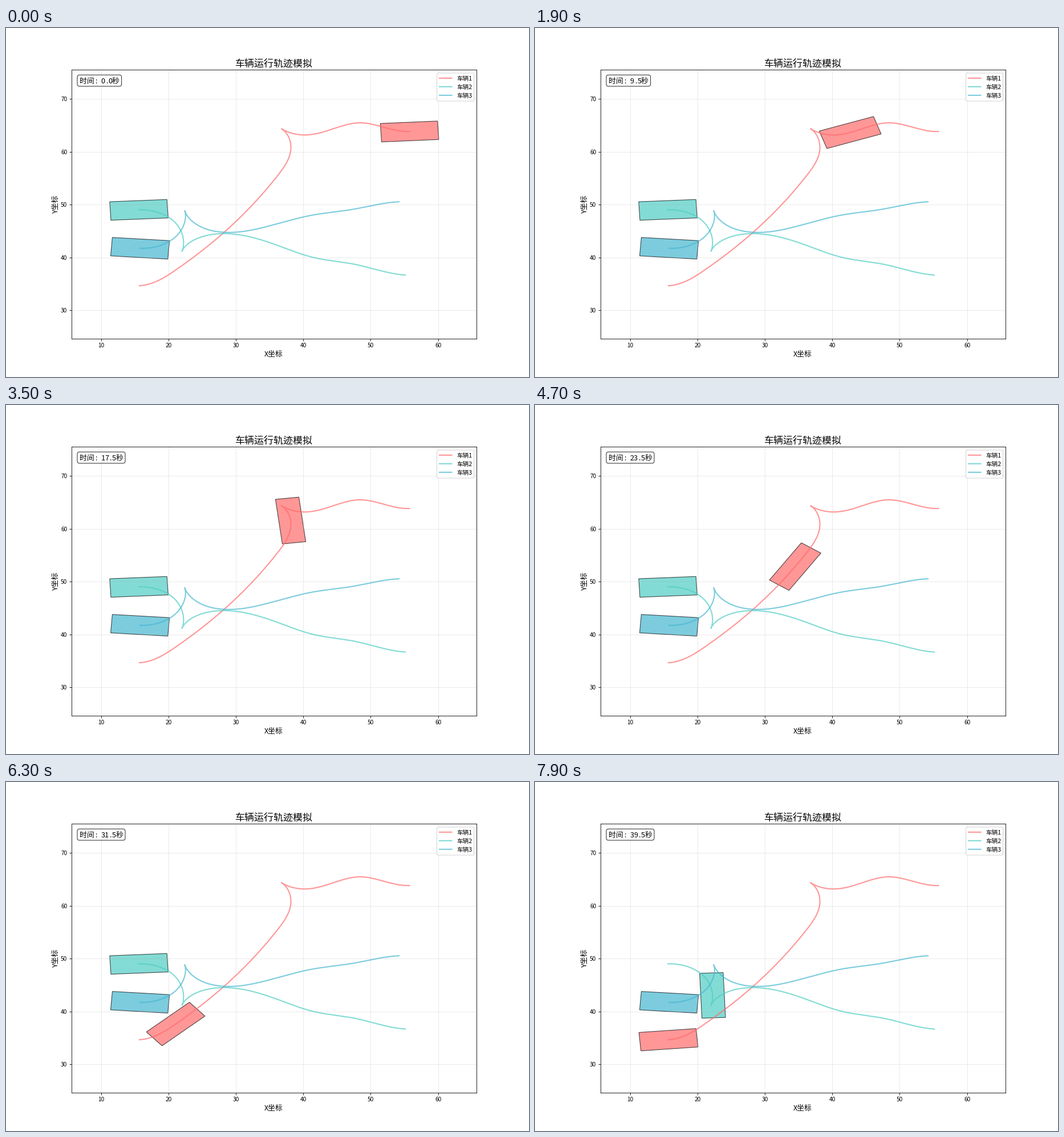
Animation of 917 by 611 pixels, one loop 8 s. Source, as a matplotlib script:

```python
import numpy as np
import matplotlib.pyplot as plt
from matplotlib.animation import FuncAnimation
from matplotlib.patches import FancyBboxPatch, Polygon

W, H, DPI, FRAMES = 917, 611, 64, 80
UNIT = 76.4 / DPI            # design points to figure points
EM = 76.4 / 72               # design points to pixels
LENGTH, WIDTH = 8.5, 3.5     # car size in plot units

plt.rcParams["font.family"] = ["Noto Sans CJK JP", "DejaVu Sans"]


def spline(t, y, v0, v1, u):
    """Smooth cubic through (t, y) with given end slopes, read at u."""
    t, y = np.array(t, float), np.array(y, float)
    h, d = np.diff(t), np.diff(y) / np.diff(t)
    a, b = np.eye(len(t)), np.zeros(len(t))
    b[0], b[-1] = v0, v1
    for i in range(1, len(t) - 1):
        a[i, i - 1:i + 2] = h[i], 2 * (h[i - 1] + h[i]), h[i - 1]
        b[i] = 3 * (h[i] * d[i - 1] + h[i - 1] * d[i])
    m = np.linalg.solve(a, b)
    u = np.clip(u, t[0], t[-1])
    j = np.clip(np.searchsorted(t, u) - 1, 0, len(h) - 1)
    q = (u - t[j]) / h[j]
    return (y[j] + (y[j + 1] - y[j]) * q * q * (3 - 2 * q)
            + h[j] * q * (1 - q) * (m[j] * (1 - q) - m[j + 1] * q))


def leg(points, head0, head1):
    """Curve through a few points, leaving and arriving at given headings."""
    p = np.array(points)
    t = np.r_[0, np.cumsum(np.hypot(*np.diff(p, axis=0).T))]
    u = np.linspace(0, t[-1], 500)
    return np.column_stack([spline(t, c, f(head0), f(head1), u)
                            for c, f in zip(p.T, (np.cos, np.sin))])


class Track:
    """Drive forward to a cusp, then reverse; headings are the car's own."""

    def __init__(self, forward, back, headings):
        start, cusp, end = np.radians(headings)
        runs = leg(forward, start, cusp), leg(forward[-1:] + back, cusp + np.pi, end + np.pi)
        self.xy = np.concatenate(runs)
        turn = [np.arctan2(*np.gradient(r, axis=0).T[::-1]) + np.pi * i
                for i, r in enumerate(runs)]
        self.heading = np.unwrap(np.concatenate(turn))
        self.s = np.r_[0, np.cumsum(np.hypot(*np.diff(self.xy, axis=0).T))]

    def outline(self, s):
        x, y, q = (np.interp(s, self.s, v) for v in (*self.xy.T, self.heading))
        c, n = np.cos(q), np.sin(q)
        box = np.array([(-1, -1), (1, -1), (1, 1), (-1, 1)]) * (LENGTH / 2, WIDTH / 2)
        return box @ np.array([(c, n), (-n, c)]) + (x, y)


red = Track([(55.77, 63.82), (48.45, 65.46), (40.24, 63.16), (36.78, 64.35)],
            [(38.17, 60.7), (36.1, 55.3), (21.17, 37.68), (15.71, 34.63)],
            (183.3, 140, 4.5))
teal = Track([(15.63, 48.99), (20.57, 47.1), (22.25, 42.97), (22.01, 41.14)],
             [(24.26, 43.56), (27.98, 44.49), (36.52, 42.11), (41.6, 39.95),
              (47.5, 38.72), (55.14, 36.65)],
             (3, -108, 175))
blue = Track([(15.8, 41.72), (20.66, 43.46), (22.39, 46.54), (22.42, 48.81)],
             [(24.68, 45.86), (28.66, 44.72), (35.25, 46.05), (41.6, 48.05),
              (47.1, 49.03), (54.2, 50.51)],
             (-4.2, 105, 183))

# Distance covered at each frame: speed up, ease through the cusp, speed up, stop.
frames = np.arange(FRAMES)
red_s = spline([0, 9, 19, 29, 35, 47, 63, 74],
               [0, 5.1, 13.65, 19.95, 23.05, 32.7, 53.05, red.s[-1]], .25, 0, frames)
teal_s = spline([64, 79], [0, 9.95], .25, .5, frames)
cars = [(red, "#FF6B6B", red_s), (teal, "#4ECDC4", teal_s), (blue, "#45B7D1", 0 * frames)]

fig = plt.figure(figsize=(W / DPI, H / DPI), dpi=DPI, facecolor="white")
ax = fig.add_axes([.125, .11, .775, .77])
ax.set(xlim=(5.61, 65.73), ylim=(24.62, 75.48),
       xticks=range(10, 61, 10), yticks=range(30, 71, 10))
ax.grid(True, alpha=.3, lw=.8 * UNIT)
ax.tick_params(length=3.5 * UNIT, width=.8 * UNIT, pad=3.5 * UNIT, labelsize=9.5 * UNIT)
for spine in ax.spines.values():
    spine.set_linewidth(.8 * UNIT)

# Overlay measured in pixels, for text and boxes.
ui = fig.add_axes([0, 0, 1, 1])
ui.set(xlim=(0, W), ylim=(H, 0))
ui.axis("off")


def label(x, y, s, size, ha="center"):
    return ui.text(x, y + .38 * size * EM, s, size=size * UNIT, ha=ha, va="baseline")


def panel(x, y, w, h, r, edge):
    return ui.add_patch(FancyBboxPatch(
        (x, y), w, h, boxstyle=f"round,pad=0,rounding_size={r}",
        fc="white", ec=edge, lw=UNIT, alpha=.8))


label(469.8, 61.5, "车辆运行轨迹模拟", 16)
label(469.5, 570, "X坐标", 12)
ui.text(86 + .38 * 12 * EM, 309, "Y坐标", size=12 * UNIT, rotation=90,
        rotation_mode="anchor", ha="center", va="baseline")

panel(755.5, 79, 65, 49, 2.1, "0.8")
bodies = []
for i, (track, color, travel) in enumerate(cars):
    stroke = dict(color=color, alpha=.7, lw=2 * UNIT)
    ax.plot(*track.xy.T, **stroke)
    bodies.append(ax.add_patch(Polygon(track.outline(0), fc=color, ec="black",
                                       alpha=.7, lw=UNIT)))
    y = 87.8 + 15 * i
    ui.plot([760, 781.5], [y, y], snap=False, **stroke)
    label(790, y, f"车辆{i + 1}", 10, ha="left")

clock_box = panel(125, 82.2, 77.6, 19.8, 3.8, "black")
clock = [label(0, 92.5, "", 12) for _ in range(9)]


def update(frame):
    for body, (track, _, travel) in zip(bodies, cars):
        body.set_xy(track.outline(travel[frame]))
    # Chinese characters take a full em, the others half.
    text = f"时间: {frame * .5:.1f}秒"
    x = 128.8
    for slot, ch in zip(clock, text.ljust(len(clock))):
        w = 12 * EM * (1 if ord(ch) > 255 else .5)
        slot.set_text(ch.strip())
        slot.set_x(x + w / 2)
        x += w
    clock_box.set_width(77.6 + 6 * EM * (len(text) - 8))
    return bodies


anim = FuncAnimation(fig, update, frames=FRAMES, interval=100, repeat=True,
                     repeat_delay=0, blit=False)
plt.show()
```
